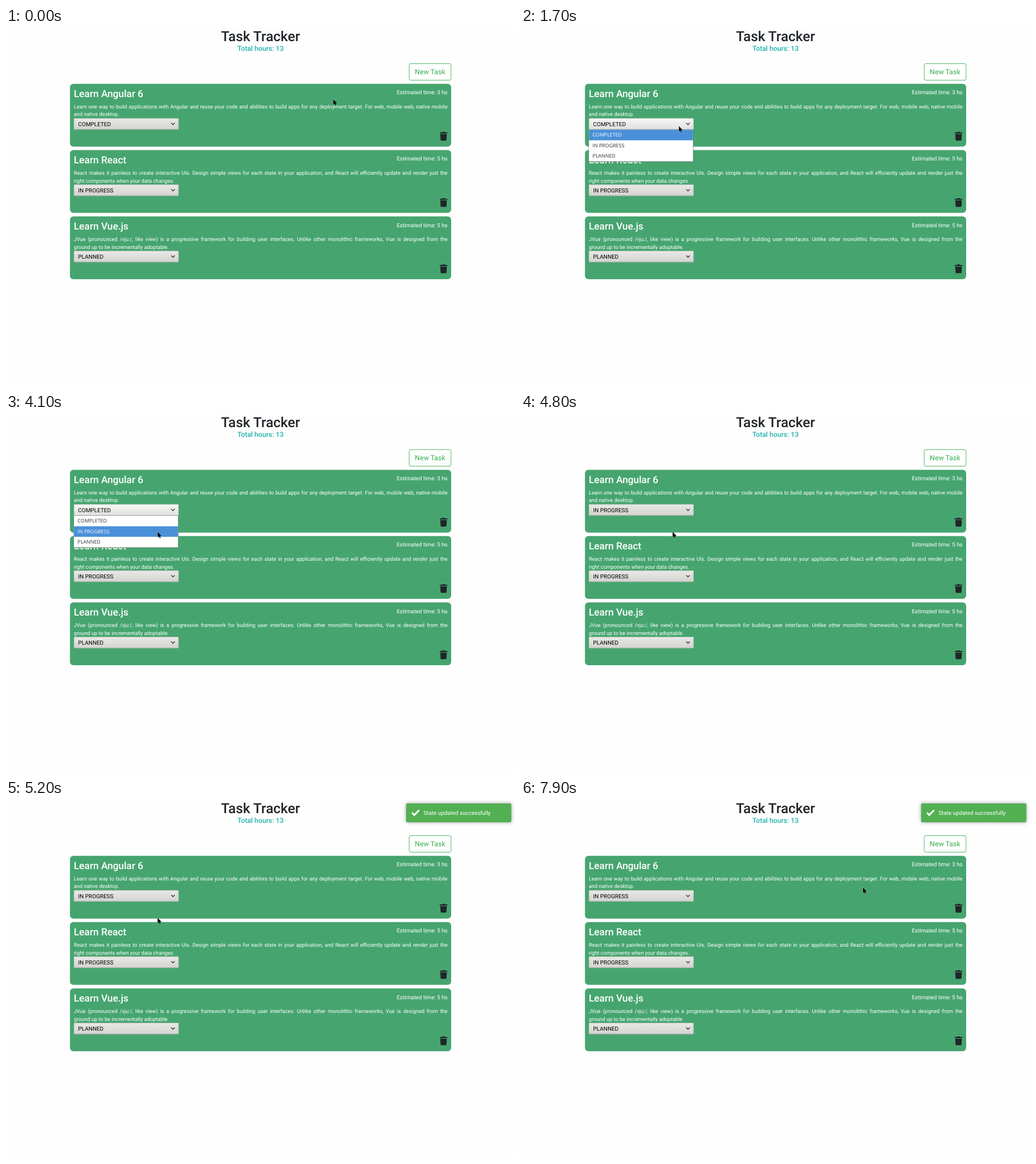
An HTML page for the animation above (8000 ms loop, 893 by 627 pixels).

```html
<!DOCTYPE html>
<html lang="en">
<head>
<meta charset="utf-8">
<title>Task Tracker</title>
<style>
  html, body { margin: 0; width: 100%; height: 100%; overflow: hidden; background: #fefefe; }
  svg { display: block; font-family: Roboto, sans-serif; text-rendering: geometricPrecision; }
  .medium { font-weight: 500; }
  .popup { font-family: "Open Sans", sans-serif; font-size: 8.85px; }
</style>
</head>
<body>
<svg id="stage" width="893" height="627" viewBox="0 0 893 627">
  <defs>
    <linearGradient id="idle" x2="0" y2="1">
      <stop stop-color="#e9e9e7"/><stop offset="1" stop-color="#d3d3d0"/>
    </linearGradient>
    <linearGradient id="hover" x2="0" y2="1">
      <stop stop-color="#f8f8f7"/><stop offset="1" stop-color="#dfdfdd"/>
    </linearGradient>
    <filter id="glow" x="-10%" y="-40%" width="120%" height="180%">
      <feGaussianBlur stdDeviation="3"/>
    </filter>
    <path id="trash" d="M432 32H312l-9-19a24 24 0 0 0-22-13H167a24 24 0 0 0-22 13l-9 19H16A16 16 0 0 0 0 48v32a16 16 0 0 0 16 16h416a16 16 0 0 0 16-16V48a16 16 0 0 0-16-16zM53 467a48 48 0 0 0 48 45h246a48 48 0 0 0 48-45L416 128H32z"/>
  </defs>
</svg>
<script>
const LOOP = 8000, STEP = 100;
const stage = document.getElementById('stage');

function add(parent, tag, attrs, content) {
  const node = document.createElementNS('http://www.w3.org/2000/svg', tag);
  for (const key in attrs) node.setAttribute(key, attrs[key]);
  if (content !== undefined) node.textContent = content;
  parent.appendChild(node);
  return node;
}

const rect = (parent, x, y, width, height, fill, more) =>
  add(parent, 'rect', { x, y, width, height, fill, ...more });

const label = (parent, x, y, size, fill, content, more) =>
  add(parent, 'text', { x, y, 'font-size': size, fill, ...more }, content);

function justify(text, width) {
  const gaps = text.textContent.split(' ').length - 1;
  text.style.wordSpacing = (width - text.getComputedTextLength()) / gaps + 'px';
}

function addSelect(parent, value) {
  const box = rect(parent, 119.2, 158.2, 183.5, 19.6, 'url(#idle)',
    { rx: 1, stroke: '#b4b8b0', 'stroke-width': 0.6 });
  add(parent, 'path', { d: 'M119.5 177.7H302.4', stroke: '#96a098', 'stroke-width': 0.7 });
  const text = label(parent, 126.6, 171.9, 9.95, '#000', value);
  add(parent, 'path', { d: 'M289.9 166.2l3.1 3.1 3.1-3.1', fill: 'none', stroke: '#1c2022', 'stroke-width': 1.2 });
  return { box, text };
}

function addCard(task, index) {
  const card = add(stage, 'g', { transform: `translate(0 ${index * 116.15})` });
  rect(card, 112.2, 97.7, 668.8, 110, '#46a56f', { rx: 6 });
  label(card, 119, 121.1, 17.25, '#fff', task.title, { class: 'medium' });
  label(card, 774.6, 116.3, 9.8, '#fff', `Estimated time: ${task.hours} hs`, { 'text-anchor': 'end' });
  justify(label(card, 119, 140.7, 9.2, '#fff', task.lines[0]), 655.6);
  label(card, 119, 154.4, 9.2, '#fff', task.lines[1]);
  add(card, 'use', { href: '#trash', transform: 'translate(760.9 181.8) scale(.0301)', fill: '#212529' });
  return addSelect(card, task.state);
}

// Header
label(stage, 446.6, 22.7, 24.3, '#212529', 'Task Tracker', { class: 'medium', 'text-anchor': 'middle' });
label(stage, 446.6, 40, 12.2, '#20b2aa', 'Total hours: 13', { class: 'medium', 'text-anchor': 'middle' });
rect(stage, 707.3, 62.4, 73.5, 29, 'none', { rx: 2.8, stroke: '#28a745', 'stroke-width': 0.8 });
label(stage, 744, 81.3, 12.3, '#34b04c', 'New Task', { 'text-anchor': 'middle' });

const tasks = [
  { title: 'Learn Angular 6', hours: 3, state: 'COMPLETED', lines: [
    'Learn one way to build applications with Angular and reuse your code and abilities to build apps for any deployment target. For web, mobile web, native mobile',
    'and native desktop.'] },
  { title: 'Learn React', hours: 5, state: 'IN PROGRESS', lines: [
    'React makes it painless to create interactive UIs. Design simple views for each state in your application, and React will efficiently update and render just the',
    'right components when your data changes.'] },
  { title: 'Learn Vue.js', hours: 5, state: 'PLANNED', lines: [
    'JVue (pronounced /vju:/, like view) is a progressive framework for building user interfaces. Unlike other monolithic frameworks, Vue is designed from the',
    'ground up to be incrementally adoptable.'] }
];
const [firstSelect] = tasks.map(addCard);

// Dropdown list
const popup = add(stage, 'g', { class: 'popup' });
rect(popup, 118.6, 178, 184, 56.8, '#5f7268', { opacity: 0.75 });
rect(popup, 119.2, 178.2, 182.6, 55.4, '#fff');
const options = tasks.map(({ state }, i) => ({
  row: rect(popup, 119.2, 178.2 + i * 18.45, 182.6, 18.45, '#4a90d9'),
  text: add(popup, 'text', { x: 125.6, y: 190.4 + i * 18.45 }, state)
}));

// Notification
const toast = add(stage, 'g');
rect(toast, 702, 6, 184.5, 33, '#999', { rx: 2, filter: 'url(#glow)' });
rect(toast, 702, 6, 184.5, 33, '#52b053', { rx: 2 });
add(toast, 'path', { d: 'M712.2 22.3l4 4 8.6-8.5', fill: 'none', stroke: '#fff', 'stroke-width': 3 });
label(toast, 732.5, 26.4, 9.82, '#fff', 'State updated successfully');

const cursor = add(stage, 'path', {
  d: 'M0 0V9.6L2.2 7.5 3.8 11 5.4 10.3 3.9 6.9H6.9Z',
  fill: '#000', stroke: '#e4ece6', 'stroke-width': 0.6, 'paint-order': 'stroke'
});

// Pointer path: time, x, y
const pointer = [
  [0, 574.3, 125], [400, 574.3, 125], [1000, 352, 179.5], [1100, 352, 179.5],
  [1400, 277, 172], [2200, 277, 172], [2600, 270.6, 196.5], [2700, 261.5, 205],
  [2800, 261.5, 205], [2900, 293, 206], [4000, 293.5, 206.5], [4100, 266, 206.5],
  [6900, 266, 206.5], [7800, 565, 172], [7900, 600, 153.5], [LOOP, 600, 153.5]
];

function pointerAt(time) {
  const next = pointer.findIndex(key => key[0] > time);
  const [t0, x0, y0] = pointer[next - 1], [t1, x1, y1] = pointer[next];
  const p = (time - t0) / (t1 - t0);
  return [x0 + (x1 - x0) * p, y0 + (y1 - y0) * p];
}

const show = (node, visible) => node.setAttribute('visibility', visible ? 'inherit' : 'hidden');

function render(elapsed) {
  const time = Math.floor((elapsed % LOOP) / STEP) * STEP;
  cursor.setAttribute('transform', `translate(${pointerAt(time)})`);

  firstSelect.box.setAttribute('fill', time >= 1300 && time < 4800 ? 'url(#hover)' : 'url(#idle)');
  firstSelect.text.textContent = time < 4800 ? 'COMPLETED' : 'IN PROGRESS';

  show(popup, time >= 1700 && time < 4800);
  const active = time < 2700 ? 0 : 1;
  options.forEach(({ row, text }, i) => {
    show(row, i === active);
    text.setAttribute('fill', i === active ? '#fff' : '#2e3436');
  });

  const fade = Math.min(1, Math.max(0, (time - 4900) / 300));
  toast.setAttribute('opacity', fade);
}

const start = performance.now();
function tick() {
  render(performance.now() - start);
  requestAnimationFrame(tick);
}
tick();
</script>
</body>
</html>
```
